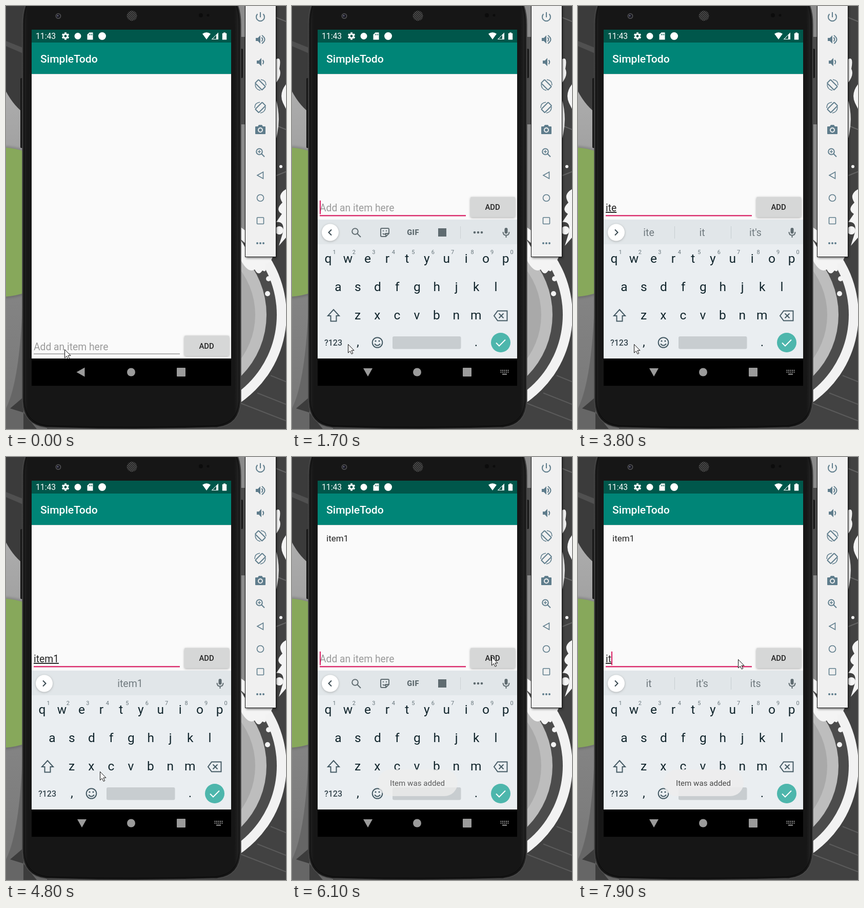
Animation, 546 px wide and 822 px high, one loop 8000 ms. Source, as an HTML page:

```html
<!DOCTYPE html>
<html lang="en">
<head>
<meta charset="utf-8">
<title>Todo list demo</title>
<style>
  html, body { margin: 0; width: 100%; height: 100%; overflow: hidden; background: #444; }
  svg { display: block; width: 546px; height: 822px; font-family: Roboto, sans-serif; }
  .line { fill: none; stroke-width: 2; }
  .mid { text-anchor: middle; }
  .medium { font-weight: 500; }
</style>
</head>
<body>
<svg id="stage" viewBox="0 0 546 822" xmlns="http://www.w3.org/2000/svg">
  <defs>
    <linearGradient id="leftTone" x2="0" y2="1">
      <stop offset="0" stop-color="#bdbdbd"/><stop offset=".3" stop-color="#a5a5a5"/>
      <stop offset=".65" stop-color="#858585"/><stop offset="1" stop-color="#777"/>
    </linearGradient>
    <linearGradient id="body" x2="1" y2="0">
      <stop offset="0" stop-color="#242424"/><stop offset=".025" stop-color="#161616"/>
      <stop offset=".97" stop-color="#161616"/><stop offset="1" stop-color="#292929"/>
    </linearGradient>
    <pattern id="mesh" width="4" height="4" patternUnits="userSpaceOnUse">
      <circle cx="1" cy="1" r="1.1" fill="#555"/><circle cx="3" cy="3" r="1.1" fill="#555"/>
    </pattern>
    <filter id="soft" x="-20%" y="-20%" width="140%" height="150%"><feGaussianBlur stdDeviation="2"/></filter>
    <clipPath id="screen"><rect x="50" y="46" width="389" height="639"/></clipPath>
  </defs>

  <!-- wallpaper -->
  <rect width="546" height="822" fill="#424242"/>
  <rect width="40" height="822" fill="url(#leftTone)"/>
  <path d="M0 0H40V212Q16 196 0 166Z" fill="#3b3b3b"/>
  <path d="M0 68L40 84V95L0 78Z" fill="#505050"/>
  <path d="M32 585Q26 730 0 782V822H80V585Z" fill="#666"/>
  <path d="M8 782L34 760V822H60L34 790Z" fill="#3c3c3c"/>
  <circle cx="-10" cy="420" r="148" fill="#333" opacity=".25" filter="url(#soft)"/>
  <circle cx="-10" cy="420" r="145" fill="#87a85b"/>
  <path d="M452 0H470V490H452Z" fill="#8b8b8b"/>
  <path d="M452 60H470V230H452Z" fill="#4b4b4b"/>
  <path d="M526 22L546 30M526 232L546 240M526 330L546 322" stroke="#646464" stroke-width="2"/>
  <circle cx="340" cy="600" r="207" fill="#f2f2f2"/>
  <circle cx="340" cy="600" r="188" fill="#4c4c4c"/>
  <circle cx="340" cy="600" r="168" fill="#bdbdbd"/>
  <circle cx="340" cy="600" r="146" fill="#a9a9a9"/>
  <path d="M458 772L546 806M490 752L546 774M516 718L546 730" stroke="#5b5b5b" stroke-width="2"/>
  <g fill="#f4f4f4">
    <path d="M526 104Q538 96 533 122Q539 134 526 150ZM546 152Q532 170 540 188L546 200ZM526 180Q536 214 529 248L526 262Z"/>
    <path d="M546 356Q528 366 539 382Q524 396 538 404L527 420Q544 418 540 440L532 466L546 450Z"/>
    <path d="M458 455L467 470L472 488H520Q514 502 505 500Q510 520 500 514Q492 526 485 512Q472 520 458 494Z"/>
    <circle cx="533" cy="436" r="8"/><circle cx="512" cy="530" r="5"/><circle cx="510" cy="559" r="5"/><circle cx="536" cy="312" r="3"/>
  </g>

  <!-- phone -->
  <rect x="28" y="140" width="6" height="136" rx="2" fill="#171717"/>
  <rect x="456" y="83" width="6" height="57" rx="2" fill="#171717"/>
  <path id="case" d="M38 -2Q32 14 32 36V768Q34 814 78 819Q245 825 412 819Q456 814 458 768V36Q458 14 452 -2Z" fill="url(#body)" stroke="#4a4a4a" stroke-width="1.5"/>
  <path d="M41 -2Q35.500 14 35.500 36V768Q38 810 80 815.500Q245 821 410 815.500Q452 810 454.500 768V36Q454.500 14 449 -2" fill="none" stroke="#090909"/>
  <circle cx="102" cy="19.500" r="5.500" fill="#4a4a4c"/><circle cx="102" cy="19.500" r="3.500" fill="#15151d"/><circle cx="101" cy="19" r="1.300" fill="#777797"/>
  <circle cx="245.500" cy="19" r="10" fill="#202020"/><circle cx="245.500" cy="19" r="10" fill="url(#mesh)"/>
  <circle cx="380" cy="18" r="4" fill="#0c0c0c"/><circle cx="394" cy="18" r="2.500" fill="#0c0c0c"/>

  <!-- app -->
  <rect x="50" y="46" width="389" height="692"/>
  <rect x="50" y="132" width="389" height="553" fill="#fafafa"/>
  <path d="M50 132.500H439" stroke="#dcdcdc"/>
  <rect x="50" y="71" width="389" height="61" fill="#008577"/>
  <rect x="50" y="46" width="389" height="25" fill="#00574b"/>
  <g fill="#fff">
    <text x="58" y="64" font-size="15.700">11:43</text>
    <text x="67" y="110" font-size="21.100" class="medium">SimpleTodo</text>
    <g id="gear"></g>
    <circle cx="140" cy="58.500" r="6.500"/>
    <path d="M162.500 51.500H169.500V65.500H158.500V55.500Z"/>
    <path d="M162.500 54v3M165 54v3M167.500 54v3" stroke="#00574b"/>
    <circle cx="187.500" cy="58.500" r="7.500"/>
    <path d="M383 54Q391 48.500 399 54L391 65Z"/>
    <path d="M414 51.500V65H400.500Z"/><path d="M410 56.500V64H403Z" fill="#00574b"/>
    <path d="M424 51.500h4v1.500h2.200v12.500h-8.400V53h2.200Z"/>
  </g>
  <text id="item" x="67" y="164" font-size="17" fill="#222">item1</text>

  <g id="form">
    <text id="entry" x="54" y="399" font-size="19.300"></text>
    <rect id="rule" x="54" width="285"/>
    <rect id="caret" y="378" width="2" height="26.500" fill="#d81b60"/>
    <rect x="348" y="372.500" width="87" height="39" rx="2" fill="#555" opacity=".5" filter="url(#soft)"/>
    <rect id="button" x="348" y="371" width="87" height="39.500" rx="2"/>
    <text x="391" y="396" font-size="14.800" class="mid medium" fill="#222">ADD</text>
  </g>

  <g clip-path="url(#screen)">
    <g id="keyboard">
      <rect x="50" y="415" width="389" height="271" fill="#eaeef1"/>
      <rect x="50" y="415" width="389" height="48" fill="#e1e6e9"/>
      <circle cx="74.500" cy="441" r="16.500" fill="#777" opacity=".5" filter="url(#soft)"/>
      <circle cx="74.500" cy="440" r="16.500" fill="#fff"/>
      <path id="chevron" class="line" stroke="#37474f"/>
      <g id="tools" fill="#5f6b70" stroke="#5f6b70">
        <circle class="line" cx="123" cy="438" r="5.800"/><path class="line" d="M127 442L134 449"/>
        <path class="line" d="M175 432H187Q189 432 189 434V442L183 448H175Q173 448 173 446V434Q173 432 175 432ZM189 442H183V448M177 442Q180 445 183 442"/>
        <circle cx="178" cy="437" r=".8"/><circle cx="184" cy="437" r=".8"/>
        <text x="236" y="445" font-size="14.500" font-weight="900" class="mid" stroke="none" letter-spacing=".5">GIF</text>
        <rect x="285" y="432" width="16" height="16" stroke="none"/>
        <path d="M328.500 428V452" stroke="#cbd1d4"/>
        <g stroke="none"><circle cx="356" cy="440" r="2.300"/><circle cx="363" cy="440" r="2.300"/><circle cx="370" cy="440" r="2.300"/></g>
      </g>
      <g id="hints" fill="#707a7f" font-size="19.500">
        <path id="dividers" d="M188.500 428V452M298.500 428V452" stroke="#c6cdd0"/>
        <text x="138" y="447" class="mid"></text><text x="242" y="447" class="mid"></text><text x="346" y="447" class="mid"></text>
      </g>
      <rect x="414.500" y="431" width="6" height="11.500" rx="3" fill="#5f6b70"/>
      <path class="line" d="M411.500 439Q411.500 445.500 417.500 445.500T423.500 439M417.500 445V450" stroke="#5f6b70"/>
      <g id="keys" fill="#10242b" font-size="24.500" class="mid"></g>
      <g class="line" stroke="#455a64">
        <path d="M81 590L92 602H86.500V612.500H75.500V602H70Z"/>
        <path d="M401 592.500H419.500V611.500H401L394 602ZM403.500 597.500L412.500 606.500M412.500 597.500L403.500 606.500"/>
        <circle cx="166.500" cy="654" r="9.800"/><path d="M161 656.500Q166.500 663 172 656.500"/>
      </g>
      <circle cx="163" cy="651" r="1.600" fill="#455a64"/><circle cx="170" cy="651" r="1.600" fill="#455a64"/>
      <text x="80.500" y="660" font-size="16" class="mid medium" fill="#37474f">?123</text>
      <rect x="196" y="642" width="133.500" height="24.500" rx="3" fill="#c8cdd0"/>
      <circle cx="407" cy="654" r="19" fill="#4db6ac"/>
      <path class="line" d="M398 654.500L404 660.500L416 648.500" stroke="#fff"/>
    </g>
    <g id="toast">
      <rect x="167" y="607" width="156" height="52" rx="26" fill="#eee" opacity=".9"/>
      <text x="244.500" y="639" font-size="15.100" class="mid" fill="#434343">Item was added</text>
    </g>
  </g>

  <!-- navigation bar -->
  <g fill="#9b9b9b">
    <path id="back" d="M137.500 711.500L153.500 702.500V720.500Z"/>
    <circle cx="244" cy="711.500" r="8"/>
    <rect x="333" y="703" width="17" height="17" rx="1"/>
    <g id="imeSwitch" stroke="#9b9b9b" stroke-width="2" fill="none">
      <path d="M406.500 708H423M406.500 711.500H423" stroke-dasharray="2 1.500"/><path d="M410 715.500H419"/>
    </g>
  </g>

  <!-- emulator controls -->
  <rect x="468" y="-5" width="60" height="495" opacity=".5" filter="url(#soft)"/>
  <rect x="466.500" y="-2" width="60" height="489.500" fill="#f0f0f0" stroke="#111"/>
  <g fill="none" stroke="#5f7d8c" stroke-width="2">
    <path d="M490.500 15.500A8 8 0 1 0 501.500 15.500M496 12V22"/>
    <g id="speaker"><path d="M487 62H491L496 57V73L491 68H487Z" fill="#5f7d8c" stroke="none"/><path d="M498.500 61Q502 65 498.500 69"/></g>
    <path d="M499 57Q510 65 499 73"/>
    <use href="#speaker" x="2" y="44"/>
    <g id="rotate">
      <rect x="486.500" y="148.500" width="19" height="9.500" rx="1" transform="rotate(45 496 153)"/>
      <path d="M497 143Q507 144 507 154M486 152Q486 162 496 164" stroke-width="1.500"/>
    </g>
    <use href="#rotate" transform="translate(992 44) scale(-1 1)"/>
    <path d="M487 234H491L493 231H499L501 234H505Q506 234 506 235V248Q506 249 505 249H487Q486 249 486 248V235Q486 234 487 234Z" fill="#5f7d8c" stroke="none"/>
    <circle cx="496" cy="241" r="4" stroke="#f0f0f0"/>
    <circle cx="494" cy="283" r="5.800"/><path d="M498 287L504 293"/><path d="M491 283H497M494 280V286" stroke-width="1.500"/>
    <path d="M490 329L501.500 322.500V335.500Z" stroke-width="1.600"/>
    <circle cx="496" cy="373" r="6.500" stroke-width="1.600"/>
    <rect x="489.500" y="411" width="13" height="12.500" rx="1" stroke-width="1.600"/>
    <path d="M490 461h.01M496 461h.01M502 461h.01" stroke-width="4" stroke-linecap="round"/>
  </g>

  <path id="pointer" d="M.5 .5V17L4.300 13.500L7.200 19.300L9.800 18L7 12.300H12Z" fill="#f8f8f8" stroke="#111"/>
</svg>

<script>
const $ = id => document.getElementById(id);
const LOOP = 8000, STEP = 100;
const PITCH = 38.45;

function glyph(char, x, y, extra = '') {
  return `<text x="${x}" y="${y}" ${extra}>${char}</text>`;
}

function buildKeys() {
  const rows = [['qwertyuiop', 70.5, 499], ['asdfghjkl', 90, 553.5], ['zxcvbnm', 128, 609]];
  let out = '';
  for (const [letters, left, base] of rows)
    [...letters].forEach((char, i) => out += glyph(char, left + i * PITCH, base));
  [...'1234567890'].forEach((char, i) =>
    out += glyph(char, 82.5 + i * PITCH, 482, 'font-size="11" fill="#68767c"'));
  $('keys').innerHTML = out + glyph(',', 128.5, 661) + glyph('.', 359, 661);
}

function buildGear() {
  let teeth = '';
  for (let a = 0; a < 360; a += 60)
    teeth += `<rect x="114.200" y="51.500" width="3.600" height="14" transform="rotate(${a} 116 58.500)"/>`;
  $('gear').innerHTML = teeth + '<circle cx="116" cy="58.500" r="5.200"/><circle cx="116" cy="58.500" r="2.400" fill="#00574b"/>';
}

// Typed text with caret position and keyboard suggestions, by start time.
const typing = [
  { at: 0, text: '', caret: 54 },
  { at: 1900, text: 'i', caret: 58.5, hints: [] },
  { at: 2000, text: 'i', caret: 58.5, hints: ['I', "I'm", 'in'] },
  { at: 3100, text: 'it', caret: 65, hints: ['it', "it's", 'its'] },
  { at: 3200, text: 'ite', caret: 75.5, hints: ['ite', 'it', "it's"] },
  { at: 4000, text: 'item', caret: 92.5, hints: ['item', "item's", 'items'] },
  { at: 4200, text: 'item1', caret: 103, hints: ['', 'item1', ''] },
  { at: 5900, text: '', caret: 54 },
  { at: 7600, text: 'i', caret: 58.5, hints: ['I', "I'm", 'in'] },
  { at: 7800, text: 'it', caret: 65, hints: ['it', "it's", 'its'] }
];
const caretOn = [[700, 1200], [1700, 2400], [3100, 3800], [4000, 4800], [5200, 6500], [6900, 7300], [7600, 8000]];

// Each row is [time, ...values], linear in between.
const pointerPath = [[100, 114, 667], [400, 114, 654], [1000, 114, 654], [1300, 109, 657],
  [4700, 109, 657], [5000, 330, 520], [5200, 420, 428], [5400, 398, 412], [5600, 389, 388],
  [6400, 389, 388], [6900, 312, 393]];
const toastFade = [[5900, 0], [6000, .5], [6100, .85], [6300, 1], [7800, 1], [7900, .97]];

function track(rows, t) {
  const next = rows.findIndex(row => row[0] > t);
  if (next === 0) return rows[0].slice(1);
  if (next < 0) return rows[rows.length - 1].slice(1);
  const a = rows[next - 1], b = rows[next], k = (t - a[0]) / (b[0] - a[0]);
  return a.slice(1).map((v, i) => v + (b[i + 1] - v) * k);
}

const set = (id, attrs) => {
  for (const name in attrs) $(id).setAttribute(name, attrs[name]);
};
const show = (id, on) => set(id, { visibility: on ? 'visible' : 'hidden' });

function render(t) {
  const state = typing.filter(s => s.at <= t).pop();
  const focused = t >= 700, raised = t >= 900;

  $('entry').textContent = state.text || 'Add an item here';
  set('entry', { fill: state.text ? '#222' : '#9a9a9a', 'text-decoration': state.text ? 'underline' : 'none' });
  set('form', { transform: `translate(0 ${raised ? 0 : 269.5})` });
  set('rule', focused ? { y: 406.3, height: 2.2, fill: '#d81b60' } : { y: 406, height: 1.1, fill: '#777' });
  set('caret', { x: state.caret });
  show('caret', caretOn.some(([from, to]) => t >= from && t < to));
  set('button', { fill: t === 5800 ? '#c2c4c4' : '#d6d7d7' });
  show('item', t >= 5900);

  const slide = Math.min(1, Math.max(0, (t - 900) / 400));
  set('keyboard', { transform: `translate(0 ${271 * (1 - slide) ** 3})` });
  show('keyboard', t > 900);
  const typed = Boolean(state.hints);
  set('tools', { display: typed ? 'none' : 'inline' });
  set('hints', { display: typed ? 'inline' : 'none' });
  set('chevron', { d: typed ? 'M72 434.500L77.500 440L72 445.500' : 'M77 434.500L71.500 440L77 445.500' });
  if (typed) {
    document.querySelectorAll('#hints text').forEach((el, i) => el.textContent = state.hints[i] || '');
    show('dividers', state.text !== 'item1');
  }

  const turn = !raised ? 0 : t < 1000 ? 90 : -90 + 60 * (1 - slide) ** 3;
  set('back', { transform: `rotate(${turn} 147 710.5)` });
  show('imeSwitch', raised);
  set('toast', { opacity: track(toastFade, t)[0] });
  set('pointer', { transform: `translate(${track(pointerPath, t).map(Math.round).join(' ')})` });
}

buildKeys();
buildGear();
$('keys').setAttribute('text-anchor', 'middle');

const start = performance.now();
function tick(now) {
  const t = Math.max(0, now - start) % LOOP;
  render(Math.floor(t / STEP) * STEP);
  requestAnimationFrame(tick);
}
render(0);
requestAnimationFrame(tick);
</script>
</body>
</html>
```
